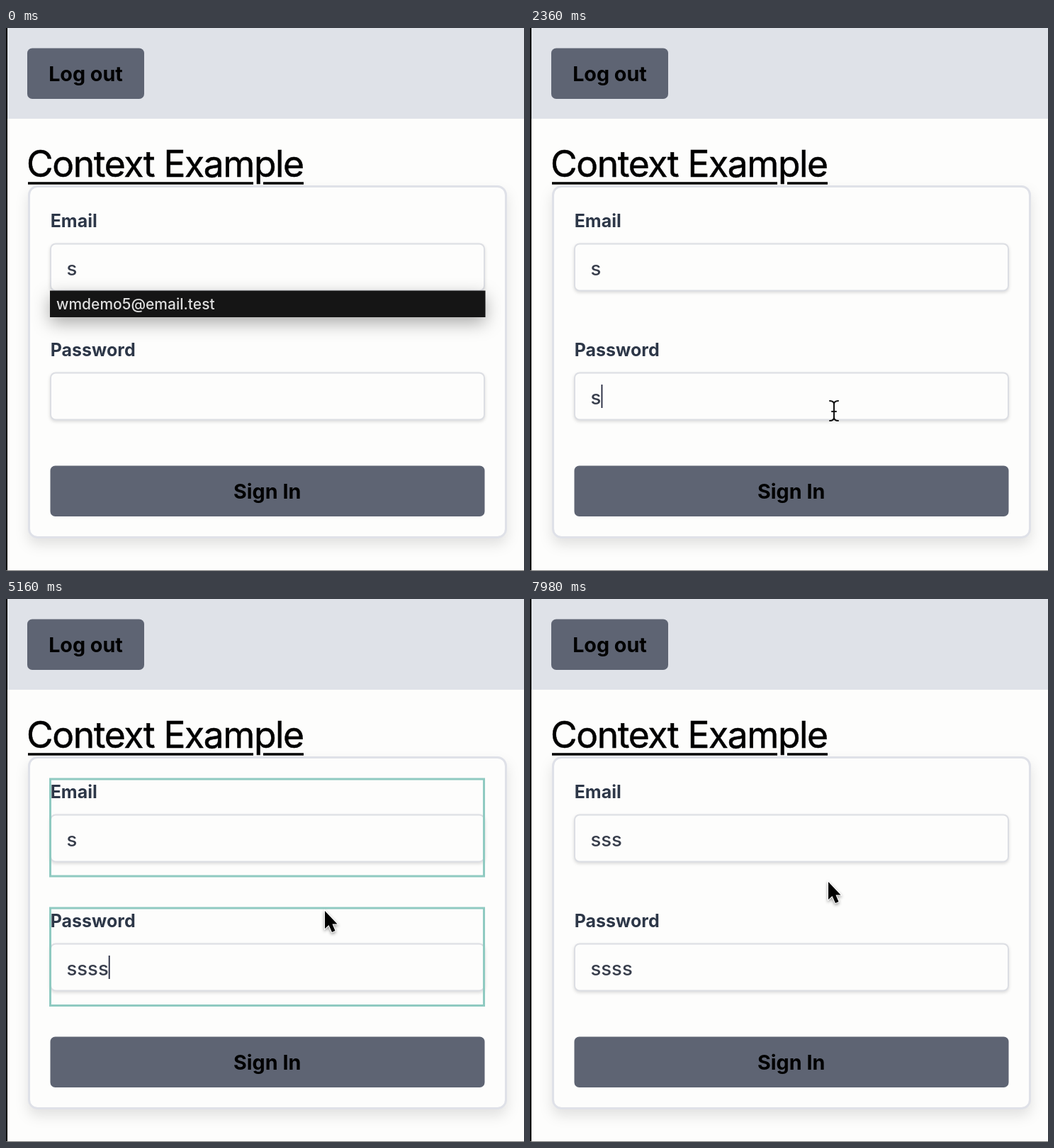
These frames come from a looping animation (731x766 px, 8000 ms). An HTML page:

```html
<!DOCTYPE html>
<html lang="en">
<head>
<meta charset="utf-8">
<title>Sign-in form</title>
<style>
  html, body { margin: 0; width: 100%; height: 100%; overflow: hidden; background: #fdfdfc; }
  svg { display: block; width: 731px; height: 766px; font-family: Inter, "Liberation Sans", sans-serif; font-optical-sizing: none; }
  text { white-space: pre; }
  .button { fill: #5e6473; }
  .button-text { font-size: 28.7px; font-weight: 700; text-anchor: middle; }
  .title { font-size: 51.5px; letter-spacing: -1.4px; stroke: #000; stroke-width: .5; }
  .label { font-size: 25px; font-weight: 700; fill: #2d3748; }
  .input { fill: #fdfdfc; stroke: #dcdee3; stroke-width: 2; filter: drop-shadow(0 2px 2px #0002); }
  .value { font-size: 27.5px; font-weight: 500; fill: #383e4c; }
  .menu { filter: drop-shadow(0 8px 12px #0005); }
  .menu text { font-size: 21px; font-weight: 500; fill: #dedede; }
  .caret { stroke: #20243a; stroke-width: 1.8; }
  .flash rect { fill: none; stroke: #8fcac1; stroke-width: 3; }
  .beam { fill: none; stroke: #111; stroke-width: 2; stroke-linecap: round; filter: drop-shadow(0 0 1px #fff); }
  .arrow { stroke: #fff; stroke-width: 2; paint-order: stroke; filter: drop-shadow(0 2px 2px #0006); }
</style>
</head>
<body>
<svg viewBox="0 0 731 766">
  <rect width="731" height="766" fill="#fdfdfc"/>
  <rect width="731" height="128" fill="#dfe2e8"/>
  <rect class="button" x="30" y="28.5" width="165" height="71.5" rx="7"/>
  <text class="button-text" x="112.5" y="75">Log out</text>

  <rect x="32.5" y="223.5" width="673" height="495" rx="12" fill="#fdfdfc" stroke="#dfe1e8" stroke-width="3"
        style="filter: drop-shadow(0 9px 9px #0000001c)"/>
  <text class="title" x="29" y="210">Context Example</text>
  <path d="M31 219H349M363 219H420" stroke="#000" stroke-width="3.5"/>

  <text class="label" x="62.7" y="281">Email</text>
  <rect class="input" x="63" y="304.5" width="612" height="66" rx="7"/>
  <text class="value" id="email" x="85.5" y="349"></text>

  <text class="label" x="62.7" y="463">Password</text>
  <rect class="input" x="63" y="486.5" width="612" height="66" rx="7"/>
  <text class="value" id="password" x="85.5" y="531"></text>

  <rect class="button" x="62.5" y="617.5" width="613" height="71.5" rx="7"/>
  <text class="button-text" x="368.7" y="664">Sign In</text>

  <g class="flash" id="flash">
    <rect x="62.5" y="254" width="612" height="137"/>
    <rect x="62.5" y="436" width="612" height="137.5"/>
  </g>
  <line class="caret" id="caret"/>

  <g class="menu" id="emailMenu">
    <rect x="62" y="370.5" width="614.5" height="37.5" fill="#151515"/>
    <text x="71" y="397">wmdemo5@email.test</text>
  </g>
  <g class="menu" id="passwordMenu">
    <rect x="62" y="552.5" width="614.5" height="73.5" fill="#181818"/>
    <rect x="63" y="554" width="612.5" height="35.5" fill="#333331"/>
    <text x="71" y="579">password</text>
    <text x="71" y="615">passwors</text>
  </g>

  <path class="beam" id="beam" d="M-6-14Q0-14 0-9Q0-14 6-14M0-9V9M-6 14Q0 14 0 9Q0 14 6 14M-3 1H3"/>
  <path class="arrow" id="arrow" d="M0 0V25L5.5 20L10 30L14.5 28L10.5 18.5H17.5Z"/>

  <rect width="2" height="766"/>
  <rect y="765" width="731" height="1" fill="#777"/>
</svg>
<script>
const LOOP = 8000;
const $ = id => document.getElementById(id);

// All times are in ms from the start of the loop.
const keyTimes = { email: [-600, 6500, 7000], password: [1250, 3400, 4700, 4950] };
const strokes = [...keyTimes.email, ...keyTimes.password];
const focusChanges = [[-600, "email"], [900, "password"], [6000, "email"]];
const caretResets = [...strokes, ...focusChanges.map(change => change[0])];
const menus = { emailMenu: [[0, 480]], passwordMenu: [[1290, 1540], [3440, 4680]] };
const pointerHidden = [[0, 450], [1250, 1700], [3400, 4980], [6500, 7450]];
const pointerPath = [
  [450, 395, 430], [850, 414, 513], [1700, 414, 513], [2340, 429, 540], [2500, 429, 540],
  [3000, 432, 567], [4980, 445, 505], [5150, 450, 440], [5250, 450, 440], [5860, 377, 347],
  [7500, 377, 347], [7960, 421, 399]
];

const within = (t, spans) => spans.some(([from, to]) => t >= from && t < to);
const show = (id, visible) => $(id).setAttribute("visibility", visible ? "visible" : "hidden");
const latest = (times, t) => Math.max(...times.filter(time => time <= t));

function pointerAt(t) {
  const next = pointerPath.findIndex(point => point[0] > t);
  if (next <= 0) return pointerPath.at(next).slice(1);
  const [t0, x0, y0] = pointerPath[next - 1];
  const [t1, x1, y1] = pointerPath[next];
  const p = (t - t0) / (t1 - t0);
  const eased = p * p * (3 - 2 * p);
  return [x0 + (x1 - x0) * eased, y0 + (y1 - y0) * eased];
}

function drawCaret(t) {
  const field = focusChanges.filter(([time]) => time <= t).at(-1)[1];
  const x = 86.7 + $(field).textContent.length * 14.75;
  const y = field === "email" ? 321 : 503;
  const caret = $("caret");
  for (const [name, value] of Object.entries({ x1: x, x2: x, y1: y, y2: y + 33 })) caret.setAttribute(name, value);
  show("caret", (t - latest(caretResets, t)) % 1000 < 500);
}

function drawPointer(t) {
  const [x, y] = pointerAt(t);
  const overInput = x > 62 && x < 676 && (y > 304 && y < 371 || y > 486 && y < 553);
  const visible = !within(t, pointerHidden);
  show("beam", visible && overInput);
  show("arrow", visible && !overInput);
  for (const id of ["beam", "arrow"]) $(id).setAttribute("transform", `translate(${x} ${y})`);
}

function draw(now) {
  const t = now % LOOP;
  for (const [field, times] of Object.entries(keyTimes)) {
    $(field).textContent = "s".repeat(times.filter(time => time <= t).length);
  }
  for (const [menu, spans] of Object.entries(menus)) show(menu, within(t, spans));
  show("flash", t - latest(strokes, t) < 260);
  drawCaret(t);
  drawPointer(t);
  requestAnimationFrame(draw);
}
draw(0);
</script>
</body>
</html>
```
